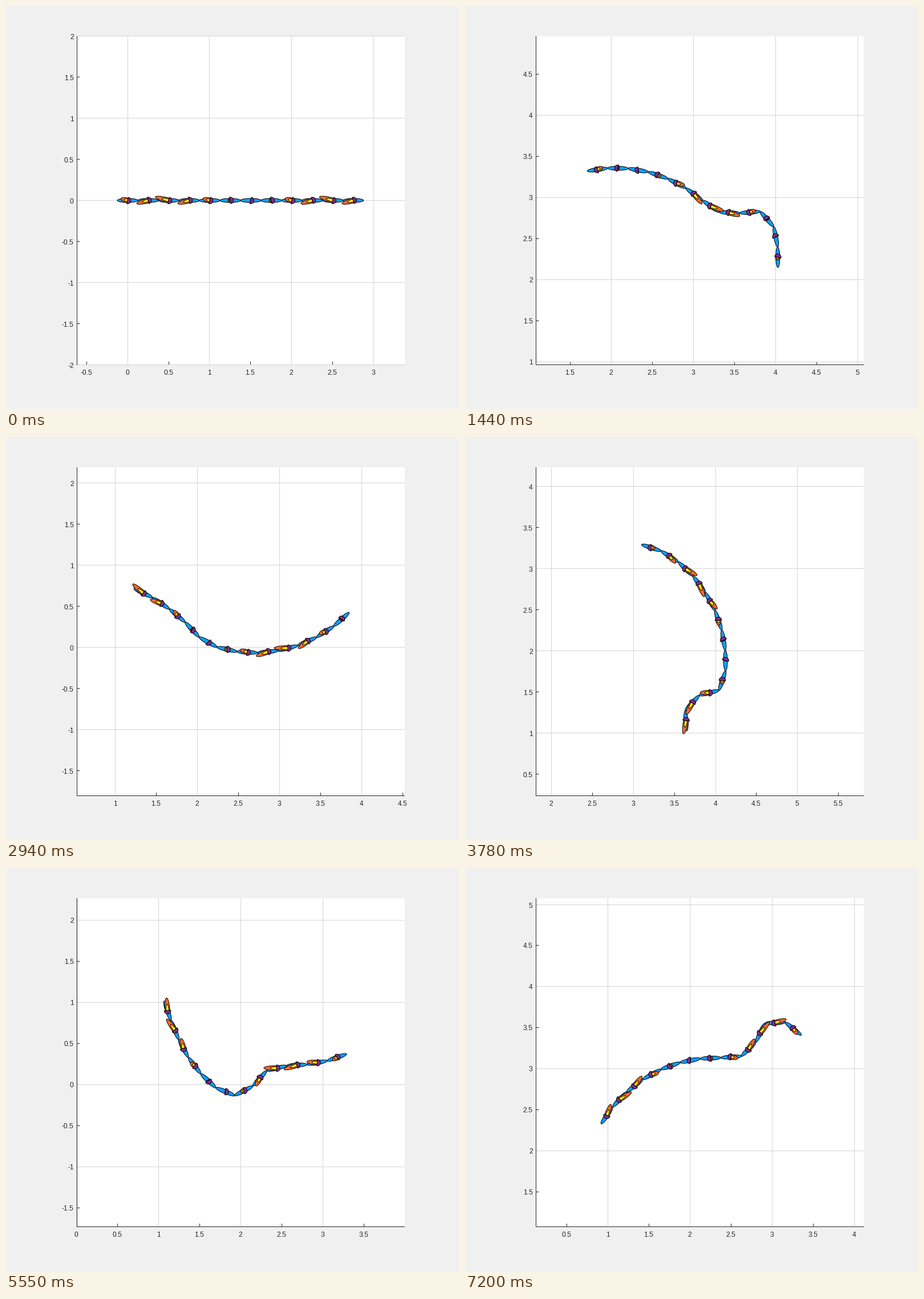
Write a matplotlib script that moves like this. It is 794 by 706 pixels and loops after 7.23 s.

```python
import numpy as np
import matplotlib.pyplot as plt
from matplotlib.animation import FuncAnimation
from matplotlib.collections import LineCollection, PolyCollection
from matplotlib.patches import Rectangle

W, H, DPI = 794, 706, 64
PX = 72 / DPI                       # one pixel in points
FRAMES, STEP = 241, 30
LEFT, RIGHT, TOP, BOTTOM = 124, 699, 53, 628
CX, CY, UNIT = 410.9, 340.65, 143.85
N, LINK = 12, 0.25
IDX = np.arange(N)
INK, GRID = "#262626", "#d4d4d4"
BLUE, ORANGE, YELLOW, PURPLE = "#129eff", "#ff6929", "#ffff00", "#7e2f8e"

# orbit of the chain's middle: time, angle, radius
ORBIT = np.array([2.5, 1.633])
TIME, ANGLE, RADIUS = np.array([
    (0, -124.56, 1.47), (26, -20.8, 1.454), (70, 154.8, 1.446), (126, 384.8, 1.437),
    (164, 526.6, 1.443), (205, 689.6, 1.466), (240, 825, 1.495),
]).T
SETTLE = 26                         # frames until the straight start is forgotten


def hermite(x, xs, ys):
    """Smooth curve through a few points."""
    k = min(np.searchsorted(xs, x, side="right"), len(xs) - 1) - 1
    m = np.gradient(ys, xs)
    h = xs[k + 1] - xs[k]
    s = (x - xs[k]) / h
    return ((2 * s**3 - 3 * s**2 + 1) * ys[k] + (s**3 - 2 * s**2 + s) * h * m[k]
            + (3 * s**2 - 2 * s**3) * ys[k + 1] + (s**3 - s**2) * h * m[k + 1])


def orbit_angle(f):
    return np.radians(hermite(f, TIME, ANGLE))


def view_centre(f):
    a = orbit_angle(f)
    r = hermite(f, TIME, RADIUS) + 0.513 * np.exp(-f / 9)
    return ORBIT + r * np.array([np.cos(a), np.sin(a)])


def bell(x):
    return np.exp(-x * x)


def bend(f, size, peak, span, link, drift, width):
    """A kink that swells and fades while it slides along the chain."""
    at = link + drift * (f - peak)
    return size * bell((f - peak) / span) * bell((IDX - at) / width)


def circling(f):
    """Headings in degrees of the chain on its round, kinks included."""
    kinks = (bend(f, 90, 26, 47, 4.5, -0.055, 1.24)
             + bend(f, -62, 126, 25, 1.8, -0.05, 0.9)
             + bend(f, 40, 130, 45, 0, 0, 0.9)
             + bend(f, 100, 222, 62, 3.65, -0.081, 1.25))
    mean = 4 * f - 38 - 5 * np.cos(orbit_angle(f))
    return mean + 9 * (IDX - (N - 1) / 2) + kinks - kinks.mean()


def headings(f):
    straight = max(0, 1 - f / SETTLE)
    return np.radians(circling(f) - straight * circling(0))


def arc(rx, ry, start, end, turn, centre):
    """Elliptic arc in units, turned and placed, as screen points."""
    t = np.radians(np.linspace(start, end, 40))
    x, y = rx * np.cos(t), ry * np.sin(t)
    c, s = np.cos(turn), np.sin(turn)
    px = centre[0] + x * c - y * s
    py = centre[1] + x * s + y * c
    return np.column_stack([CX + px * UNIT, CY - py * UNIT])


def chain(f):
    th = headings(f)
    step = LINK * np.column_stack([np.cos(th), np.sin(th)])
    mid = np.cumsum(step, axis=0) - step / 2
    mid -= mid.mean(axis=0)
    power = (1 + np.sin(np.pi * IDX / 4 + 2 * np.pi * f / 30)) / 2
    polys = []
    for i in range(N):
        tilt = th[i] + np.radians(15 if i % 2 else -15)
        flame = power[i] / 6
        polys += [
            arc(0.125, 0.025, 0, 360, th[i], mid[i]),
            arc(flame, 0.03, 90, 270, tilt, mid[i]),
            arc(flame / 2, 0.0175, 90, 270, tilt, mid[i]),
            arc(0.04, 0.04, -90, 90, tilt, mid[i]),
        ]
    return polys


def ticks(centre):
    lo, hi = 2 * (centre - 2), 2 * (centre + 2)
    return np.arange(np.ceil(lo - 0.005), np.floor(hi + 0.005) + 1) / 2 + 0.0


def crisp(v):
    return np.floor(v) + 0.5


fig = plt.figure(figsize=(W / DPI, H / DPI), dpi=DPI, facecolor="#f0f0f0")
ax = fig.add_axes([0, 0, 1, 1])
ax.set_xlim(0, W)
ax.set_ylim(H, 0)
ax.axis("off")
ax.add_patch(Rectangle((LEFT, TOP), RIGHT - LEFT, BOTTOM - TOP, fc="white", lw=0, zorder=0))

axis_lines = LineCollection([], colors=INK, linewidths=PX, zorder=1, snap=False)
grid_lines = LineCollection([], colors=GRID, linewidths=PX, zorder=2, snap=False)
links = PolyCollection([], facecolors=[BLUE, ORANGE, YELLOW, PURPLE] * N,
                       edgecolors="black", linewidths=PX, zorder=3)
for c in (axis_lines, grid_lines, links):
    ax.add_collection(c, autolim=False)


def label_pool(align):
    return [ax.text(0, 0, "", ha=align, va="baseline", color=INK, zorder=4,
                    family="Liberation Sans", size=12 * PX) for _ in range(10)]


x_labels, y_labels = label_pool("center"), label_pool("right")


def draw(f):
    vx, vy = view_centre(f)
    left, base = LEFT + 0.5, BOTTOM + 0.5
    dark = [[(left, TOP), (left, base)], [(left, base), (RIGHT, base)]]
    light = []
    for t in x_labels + y_labels:
        t.set_text("")
    for v, t in zip(ticks(vx), x_labels):
        x = crisp(CX + (v - vx) * UNIT)
        dark.append([(x, base), (x, base - 5.5)])
        if v % 1 == 0:
            light.append([(x, TOP), (x, BOTTOM)])
        t.set_text(f"{v:g}")
        t.set_position((x - 0.5, 645.5))
    for v, t in zip(ticks(vy), y_labels):
        y = crisp(CY - (v - vy) * UNIT)
        dark.append([(left, y), (left + 5, y)])
        if v % 1 == 0:
            light.append([(LEFT + 1, y), (RIGHT, y)])
        t.set_text(f"{v:g}")
        t.set_position((118.7, y + 5))
    axis_lines.set_segments(dark)
    grid_lines.set_segments(light)
    links.set_verts(chain(f))
    return [axis_lines, grid_lines, links, *x_labels, *y_labels]


anim = FuncAnimation(fig, draw, frames=FRAMES, interval=STEP, repeat=True,
                     repeat_delay=0, blit=False)
plt.show()
```
